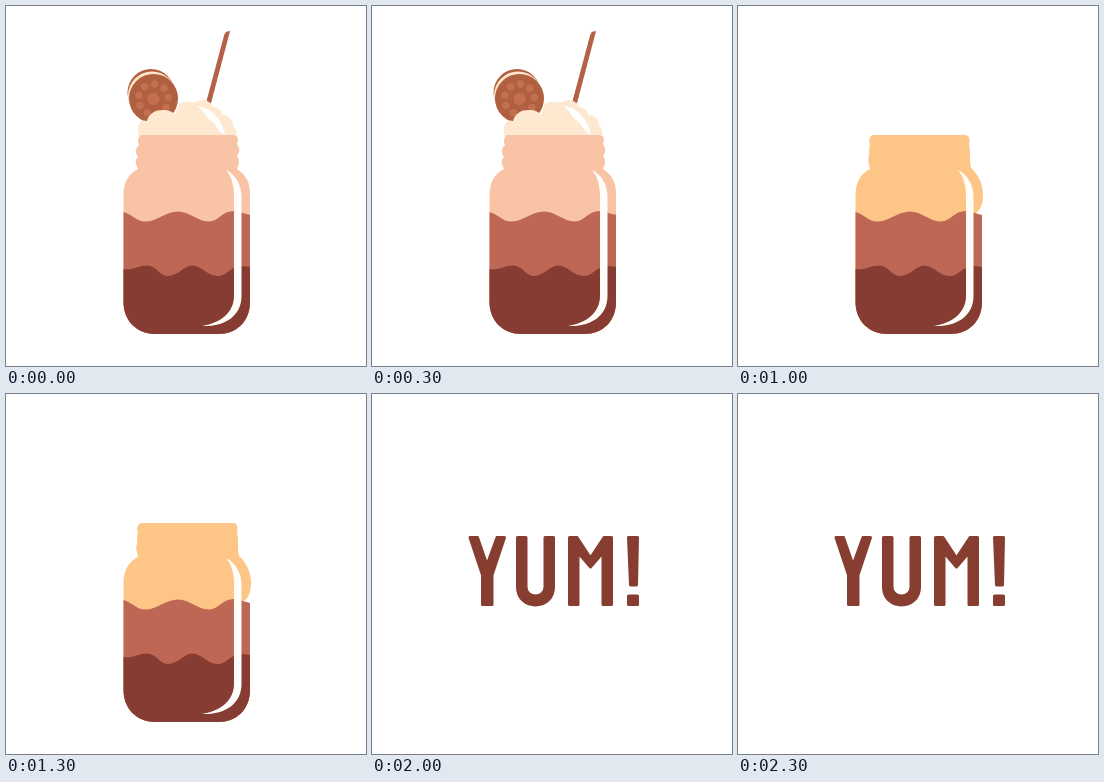
Write an HTML page that moves like this. It is 360 by 360 pixels and loops after 2500 ms.

```html
<!DOCTYPE html>
<html lang="en">
<head>
<meta charset="utf-8">
<title>Milkshake</title>
<style>
  html, body { margin: 0; width: 100%; height: 100%; overflow: hidden; background: #fff; }
  svg { display: block; width: 100vw; height: 100vh; }
</style>
</head>
<body>
<svg viewBox="0 0 360 360">
  <defs>
    <clipPath id="strawShape"><path d="M219 26L224 25L205 97H200Z"/></clipPath>
    <clipPath id="jarShape"><path id="outline"/></clipPath>
  </defs>

  <g id="topping">
    <g clip-path="url(#strawShape)">
      <path d="M195 20H230V100H195Z" fill="#fdebdc"/>
      <g id="stripes" stroke="#b5614a" stroke-width="4"></g>
    </g>
    <circle cx="145" cy="86.500" r="23.500" fill="#b06040"/>
    <circle cx="146" cy="89.500" r="24" fill="#fee6ca"/>
    <circle cx="147.500" cy="92.500" r="24.500" fill="#b06040"/>
    <g id="dots" fill="#c2704f"></g>
    <path fill="#fee8d0" d="M132.500 130C131 121 133 112 141 115C143 107 150 104 157 104C163 104 167 106 169 109L173 98C179 94 187 98 192 95C199 92 205 96 207 101C213 101 216 106 216 109C222 108 228 115 227 120C230 122 231 126 230 130Z"/>
    <path fill="#fff" d="M191 100C203 100 216 112 219 129C211 126 211 118 205 115C200 112 199 105 191 100Z"/>
  </g>

  <g id="jar">
    <g clip-path="url(#jarShape)">
      <path id="top" d="M100 120H260V340H100Z"/>
      <path id="middle" fill="#be6754" d="M117 206C125 207 130 216 140 215.500C152 215 160 205.500 172 205.500C184 205.500 192 216 203 215.500C213 215 216 205 228 205C233 205 237 208 246 209V330H117Z"/>
      <path fill="#863c32" d="M117 263C126 265 132 259.500 141 259.500C151 259.500 153 270 162 270C172 270 178 259.500 186 259.500C196 259.500 202 271 213 270C221 269.500 225 260 236 260L246 261V330H117Z"/>
    </g>
    <path fill="#fffdfa" d="M220 164C230 169 235.500 179 235.500 191V290C235.500 309 220 321 196 320C215 317 228 306 228 290V190C228 180 226 171 220 164Z"/>
  </g>

  <g id="yum" role="img" aria-label="YUM!" fill="#883d31" stroke="#883d31" stroke-width="3" stroke-linejoin="round">
    <path d="M98 143.500H105.500L115 171L125 143.500H132.500L120 181V210.500H110.500V181Z"/>
    <path d="M145.500 143.500H154V193C154 205 173 205 173 193V143.500H181.500V193C181.500 217 145.500 217 145.500 193Z"/>
    <path d="M197.500 143.500H205L218.500 164L232 143.500H239.500V210.500H231V158.500L218.500 173L206 158.500V210.500H197.500Z"/>
    <path d="M256.500 143.500H265.500L264.500 191H258.500ZM256.500 202H265.500V210.500H256.500Z"/>
  </g>
</svg>
<script>
  const $ = id => document.getElementById(id);
  const STEP = 500, STEPS = 5;

  const wavyNeckL = 'C130 158 128 155 132 151C129 146 129 143 133 139C131 136 132 129 136 129';
  const plainNeckL = 'C131 157 129 153 131.500 149C130 143 133 139 131 135C132 130 134 129 136 129';
  const wavyNeckR = 'H227C232 129 233 134 231 138C234 143 234 146 231 150C234 154 233 159 231 163';
  const plainNeckR = 'H227C232 129 232 135 231 139C233 146 231 154 233 162';
  const sides = {
    straight: 'C239 168 244 175 244 187V296',
    notched: 'C240 168 244 176 245 187C245 199 243 203 238 207L244 209V296',
    dented: 'C240 168 245 176 245 187C245 205 242 215 241.500 230C240 245 244 250 244 262V296'
  };
  const jarPath = (wavy, side) =>
    'M132 163' + (wavy ? wavyNeckL + wavyNeckR : plainNeckL + plainNeckR) + sides[side] +
    'C244 315 231 328 212 328H150C131 328 117.500 315 117.500 296V190C117.500 177 122 168 132 163Z';

  const range = n => [...Array(n).keys()];
  $('stripes').innerHTML = range(10).map(i => {
    const x = 221 - i * 2.1, y = 28 + i * 8;
    return `<path d="M${x - 6} ${y + 8}L${x + 6} ${y - 8}"/>`;
  }).join('');
  const dot = (x, y, r) => `<circle cx="${x}" cy="${y}" r="${r}"/>`;
  $('dots').innerHTML = dot(147.5, 93, 6) + range(9).map(i => {
    const a = i * Math.PI * 2 / 9 - 1.5;
    return dot(147.5 + 15 * Math.cos(a), 93 + 15 * Math.sin(a), 3.7);
  }).join('');

  const show = (id, on) => $(id).style.display = on ? '' : 'none';
  function draw(now) {
    const step = Math.floor(now / STEP) % STEPS;
    show('topping', step === 0);
    show('jar', step < 4);
    show('middle', step < 3);
    show('yum', step === 4);
    $('top').setAttribute('fill', step < 2 ? '#f9c4a6' : '#fdc687');
    const side = step < 2 ? 'straight' : step === 2 ? 'notched' : 'dented';
    $('outline').setAttribute('d', jarPath(step < 2, side));
    requestAnimationFrame(draw);
  }
  draw(performance.now());
</script>
</body>
</html>
```
